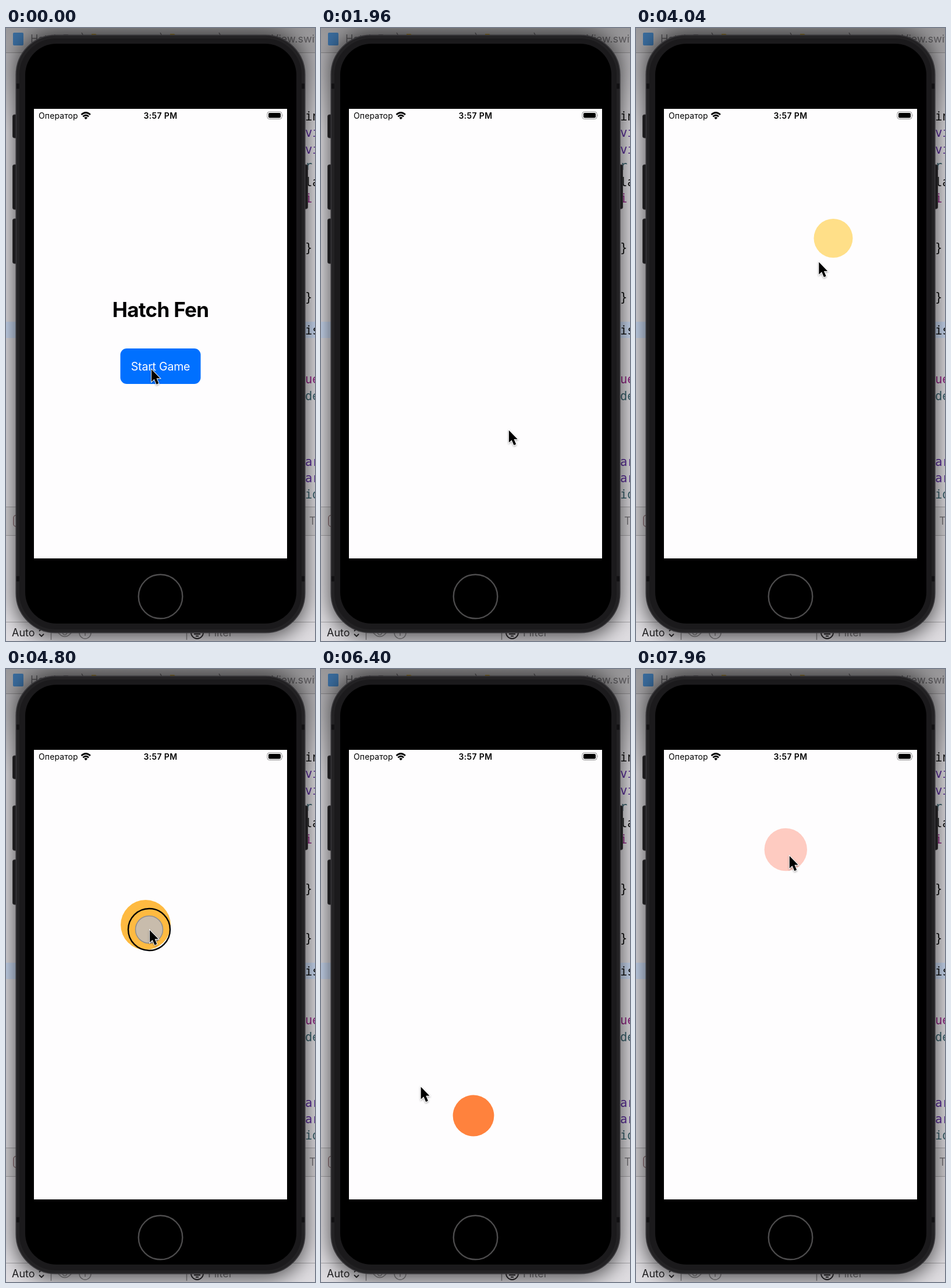
An HTML page that plays this animation: 531 by 1054 pixels, repeating every 8 s.

```html
<!DOCTYPE html>
<html lang="en">
<head>
<meta charset="utf-8">
<title>Tap game</title>
<style>
html, body { margin: 0; height: 100%; overflow: hidden; background: #d6d4d7; }
svg { display: block; width: 100vw; height: 100vh; font-family: Inter, "Noto Sans", sans-serif; }
#code { font: 20.5px "DejaVu Sans Mono", monospace; white-space: pre; }
</style>
</head>
<body>
<svg viewBox="0 0 531 1054">
  <defs>
    <filter id="blur" x="-20%" y="-20%" width="140%" height="140%"><feGaussianBlur stdDeviation="17"/></filter>
    <filter id="soft" x="-50%" y="-50%" width="200%" height="200%"><feDropShadow dx="0" dy="1.5" stdDeviation="1.5" flood-opacity=".4"/></filter>
    <linearGradient id="shade" x2="0" y2="1"><stop stop-opacity=".28"/><stop offset="1" stop-opacity="0"/></linearGradient>
  </defs>

  <!-- editor window -->
  <rect width="531" height="1054" fill="#dedce0"/>
  <rect width="531" height="42" fill="#d3d1d4"/>
  <rect y="505" width="531" height="28" fill="#c9d8f0"/>
  <rect y="823" width="531" height="49" fill="#d5d3d6"/>
  <path d="M0 42.5H531M0 823.5H531M0 872.5H531M0 1021.5H531" stroke="#a5a3a6"/>
  <rect x="12" y="8" width="18" height="22" rx="2" fill="#4f93d6"/>
  <g font-size="18" fill="#777579">
    <text x="42" y="25">Hatch Fen</text>
    <text x="456" y="25">View.swift</text>
    <text x="521" y="854">T</text>
    <text x="347" y="1046">Filter</text>
  </g>
  <path d="M147 10h7l2 2h11v14h-20zM282 10h7l2 2h13v14h-22z" fill="#d9b03c"/>
  <path d="M130 8l6 11-6 11M265 8l6 11-6 11M366 8l6 11-6 11" fill="none" stroke="#777579" stroke-width="1.5"/>
  <rect x="13" y="838" width="22" height="19" rx="4" fill="none" stroke="#8c6f74" stroke-width="1.5"/>
  <g fill="none" stroke="#8b898c" stroke-width="1.5">
    <path d="M90 1040q11 -13 22 0q-11 13 -22 0zM77.5 1027v25M310.5 1027v25"/>
    <circle cx="101" cy="1040" r="3.5"/>
    <circle cx="136" cy="1040" r="10"/>
    <path d="M136 1038v7"/>
  </g>
  <g id="code"></g>
  <rect width="531" height="180" fill="url(#shade)"/>

  <!-- phone -->
  <rect x="14" y="5" width="503" height="1044" rx="72" opacity=".62" filter="url(#blur)"/>
  <text x="10" y="1046" font-size="18" fill="#1d1c1e">Auto</text>
  <g fill="none" stroke="#1d1c1e" stroke-width="1.8">
    <path d="M57 1037l4-4 4 4M57 1042l4 4 4-4M323 1042h11M326 1045.5h5"/>
    <circle cx="328.5" cy="1039.5" r="10.5"/>
  </g>
  <g fill="#1b1a1c" stroke="#343335">
    <rect x="11.5" y="149" width="12" height="40" rx="3"/>
    <rect x="11.5" y="235" width="12" height="77" rx="3"/>
    <rect x="11.5" y="328" width="12" height="77" rx="3"/>
    <rect x="507" y="235" width="11.5" height="76" rx="3"/>
  </g>
  <rect x="17.5" y="12.5" width="496" height="1027" rx="68" fill="#1b1a1c" stroke="#363538" stroke-width="2"/>
  <rect x="21" y="16" width="489" height="1020" rx="65" fill="none" stroke="#232224" stroke-width="4"/>
  <path d="M18 100h5M18 947h5M508 100h5M508 947h5" stroke="#121113" stroke-width="9"/>
  <rect x="33" y="27" width="466" height="997" rx="54"/>
  <circle cx="265.5" cy="977.5" r="37.8" fill="none" stroke="#4d4c4d" stroke-width="2.4"/>
  <rect x="48" y="139" width="435" height="773" fill="#fefdfe"/>

  <!-- status bar -->
  <text x="56" y="156" font-size="14" letter-spacing=".1">Оператор</text>
  <text x="265.5" y="156" font-size="14" font-weight="600" letter-spacing=".35" text-anchor="middle">3:57 PM</text>
  <path d="M129.5 149q7.7-7 15.4 0M132.3 152.2q4.9-4.4 9.8 0" fill="none" stroke="#000" stroke-width="2.7"/>
  <path d="M134.3 154.2q2.9-2.4 5.800 0l-2.9 3z"/>
  <rect x="449" y="144" width="25" height="12.5" rx="3.5" fill="none" stroke="#8c8b8c"/>
  <rect x="451" y="146" width="21" height="8.5" rx="2"/>
  <path d="M475.5 148.2q1.5 2 0 4z" fill="#8c8b8c"/>

  <!-- start screen -->
  <g id="menu" text-anchor="middle">
    <text x="265.5" y="496.5" font-size="35" font-weight="700" letter-spacing="-.7">Hatch Fen</text>
    <rect x="196.5" y="551" width="138" height="61" rx="11" fill="#0070ff"/>
    <text id="label" x="265.5" y="588.5" font-size="19.5" letter-spacing="-.2" fill="#fff">Start Game</text>
  </g>

  <circle id="ball"/>
  <g id="touch">
    <circle r="36" fill="none" stroke="#000" stroke-width="2.4"/>
    <circle r="23.5" fill="#bfbdbe" fill-opacity=".86" stroke="#8f8d8e" stroke-width="1.5"/>
  </g>
  <g id="cursor">
    <path transform="translate(1 1) scale(.9)" d="M0 0V23.5L5.3 18.6 9.5 28.5 13.7 26.7 9.6 17H16.5Z" stroke="#fff" stroke-width="2" paint-order="stroke" filter="url(#soft)"/>
  </g>
</svg>
<script>
const $ = id => document.getElementById(id);
const LOOP = 8000, STEP = 40;                       // ms
const RADIUS = 37, ENTER = 300, EXIT = 192, HOLD = 146;
const START_TAP = 500, LEAVE = 1160, FIRST_BALL = 2000;

// x, y, time tapped, offset of the finger from the centre
const balls = [
  [346.5, 484, 3708, -34, -8],
  [339, 361.5, 4200, -25, -20],
  [240, 440, 4750, 6, 8],
  [182, 554, 5376, 8.5, 22.5],
  [150, 700, 5980, 6, 8],
  [262, 768, 6883, -2, 8],
  [257.3, 458.5, 7420, 0, 16],
  [257.3, 310.5, 7814, 5.5, 10]
].map(([x, y, tap, dx, dy]) => ({ x, y, tap, stop: [tap, x + dx, y + dy] }));
balls.forEach((b, i) => b.shown = i ? balls[i - 1].tap + EXIT : FIRST_BALL);

const taps = [START_TAP, ...balls.map(b => b.tap)];
const stops = [[0, 249, 586], [START_TAP, 249, 586], [1080, 326, 716], [2760, 309, 611], ...balls.map(b => b.stop)];

const clamp = v => Math.max(0, Math.min(1, v));
const smooth = v => v * v * (3 - 2 * v);

function set(id, attrs) {
  for (const k in attrs) $(id).setAttribute(k, attrs[k]);
}

// Visible ends of the code lines; the first letter picks the colour
function drawCode() {
  const colours = { k: "#111", p: "#5a2c99", t: "#38606b", m: "#8e2380" };
  const lines = "kin|pvi|pvi|t r|kla|m i|||k }|||k }||kis|||mue|tde||||par|par|tid".split("|");
  $("code").innerHTML = lines.map((s, i) =>
    `<text x="514" y="${159 + 28.27 * i}" fill="${colours[s[0]]}">${s.slice(1)}</text>`).join("");
}

// The cursor rests at each stop, then glides to the next
function cursorAt(t) {
  const i = stops.findIndex(s => s[0] > t);
  if (i < 0) return stops.at(-1).slice(1);
  const [t0, x0, y0] = stops[i - 1], [t1, x1, y1] = stops[i];
  const e = smooth(clamp(((t - t0) / (t1 - t0) - .3) / .7));
  return [x0 + (x1 - x0) * e, y0 + (y1 - y0) * e];
}

function drawBall(t) {
  const i = balls.findIndex(b => t >= b.shown && t < b.tap + EXIT);
  if (i < 0) return set("ball", { opacity: 0 });
  const { x, y, shown, tap } = balls[i];
  let opacity = clamp((t - shown) / ENTER);
  let scale = .82 + .18 * opacity;
  if (t >= tap) {
    const p = (t - tap) / EXIT;
    opacity = 1 - p;
    scale = 1 + .18 * Math.sin(Math.PI * p / .75);
  }
  set("ball", { cx: x, cy: y, r: RADIUS * scale, opacity, fill: `rgb(255,${212 - 24 * i},0)` });
}

function draw(now) {
  const t = Math.floor(now % LOOP / STEP) * STEP;
  const transform = `translate(${cursorAt(t)})`;
  set("cursor", { transform });
  set("touch", { transform, opacity: +taps.some(s => t >= s && t < s + HOLD) });
  set("label", { opacity: t < START_TAP ? 1 : .2 });
  set("menu", { opacity: 1 - clamp((t - LEAVE) / 240) });
  drawBall(t);
}

drawCode();
const begin = performance.now();
function tick() {
  draw(performance.now() - begin);
  requestAnimationFrame(tick);
}
tick();
</script>
</body>
</html>
```
